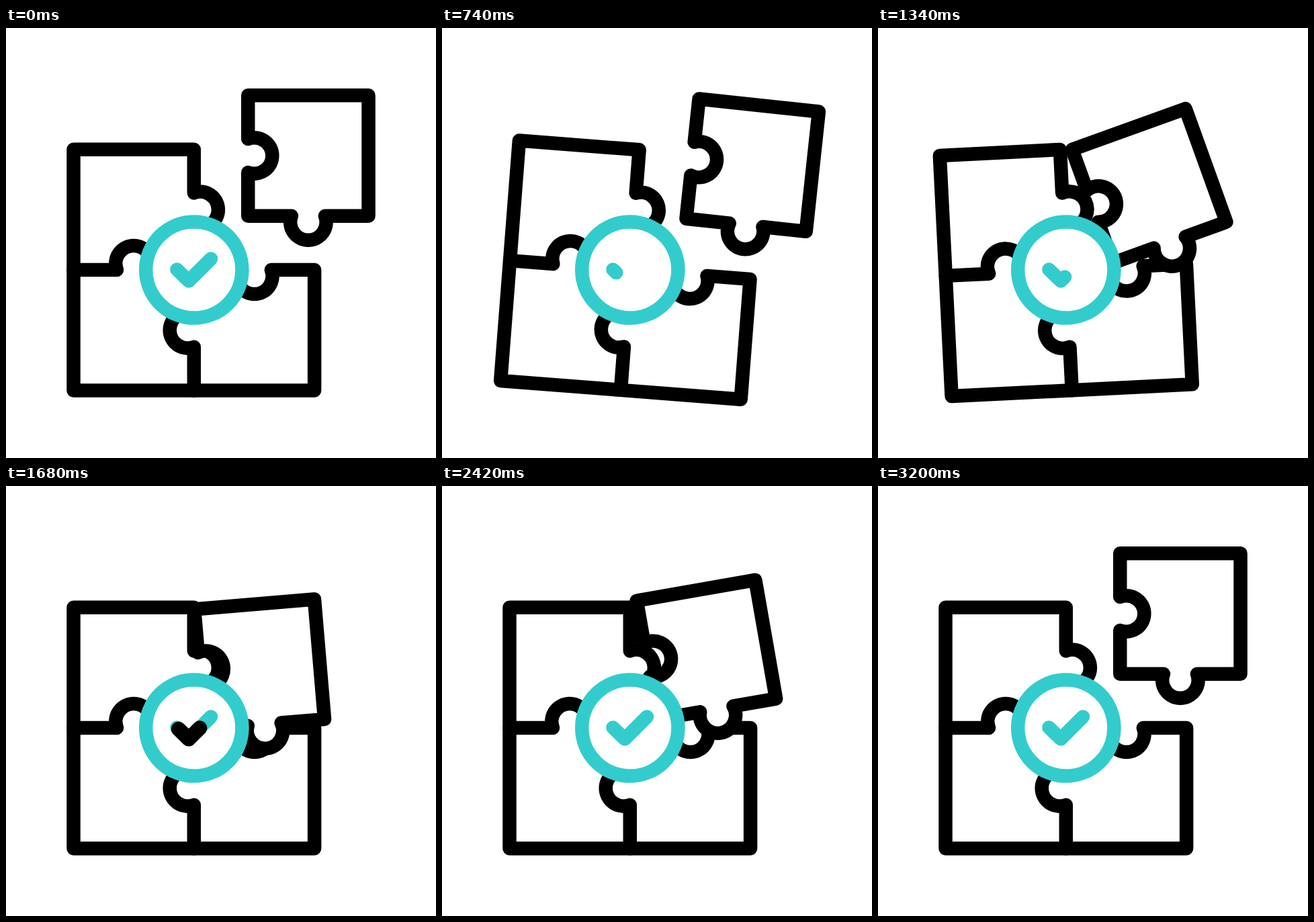
An HTML page for the animation above (3.42 s loop, 640 by 640 pixels).

```html
<!DOCTYPE html>
<html>
<head>
<meta charset="utf-8">
<style>
html, body { margin: 0; width: 100%; height: 100%; overflow: hidden; background: #fff; }
svg { display: block; width: 100%; height: 100%; }
</style>
</head>
<body>
<svg viewBox="0 0 640 640">
  <g transform="translate(279.8 360)" fill="none" stroke="#000" stroke-width="20.5" stroke-linecap="round" stroke-linejoin="round">
    <g id="board">
      <path d="M0 179.4H-179.3V-179.2H0V-114.6A26.7 26.7 0 1 1 0 -64.6"/>
      <path d="M-179.3 0H-114.8A26.7 26.7 0 1 1 -64.8 0"/>
      <path d="M0 179.4V114.8A26.7 26.7 0 1 1 0 64.8"/>
      <path d="M0 179.4H179.3V0H115A26.7 26.7 0 1 1 65 0"/>
      <path id="piece" fill="#fff" d="M-89.65 -25V-89.65H89.65V89.65H25A26.7 26.7 0 1 1 -25 89.65H-89.65V25A26.7 26.7 0 1 0 -89.65 -25"/>
    </g>
    <circle r="71.6" fill="#fff" stroke="#33cccc"/>
    <path id="check" stroke="#33cccc" pathLength="1" d="M-25.3 -.5L-7.8 16.5L25.2 -16.5"/>
    <path id="sweep" stroke-width="22" pathLength="1" d="M-25.3 -.5L-7.8 16.5L25.2 -16.5"/>
  </g>
</svg>
<script>
const LOOP = 3420;
const [board, piece, check, sweep] = ['board', 'piece', 'check', 'sweep'].map(id => document.getElementById(id));

function ease(t, from, to) {
  const p = Math.min(1, Math.max(0, (t - from) / (to - from)));
  return p * p * (3 - 2 * p);
}

// Rocks through the peaks and back to 0; each swing lasts ratio times the one before.
function swing(t, start, length, ratio, ...peaks) {
  let angle = 0, last = 0;
  for (const peak of [...peaks, 0]) {
    angle += (peak - last) * ease(t, start, start + length);
    last = peak;
    start += length;
    length *= ratio;
  }
  return angle;
}

function trim(path, start, end) {
  path.style.display = end > start ? '' : 'none';
  path.setAttribute('stroke-dasharray', `${end - start} 9`);
  path.setAttribute('stroke-dashoffset', -start);
}

function draw(t) {
  const tilt = swing(t, 0, 429, .97, -5.1, 6.2, -3.3);
  const spin = swing(t, 690, 270, 1.4, 18, -17) + swing(t, 1960, 413, 1, -11, 18.5);

  // The piece travels on a slightly bowed diagonal.
  const slide = ease(t, 690, 1880) - ease(t, 1960, 3200);
  const bow = (t < 1930 ? 5.6 : -1.7) * Math.sin(Math.PI * slide);
  const x = 170.1 - 80 * slide + bow, y = -170 + 80 * slide + bow;

  board.setAttribute('transform', `rotate(${tilt})`);
  piece.setAttribute('transform', `translate(${x} ${y}) rotate(${spin})`);
  trim(check, 0, Math.max(.002, 1 - ease(t, 246, 856) + ease(t, 1070, 1640)));
  trim(sweep, ease(t, 1640, 1960), ease(t, 1460, 1820));
}

const begin = performance.now();
function frame() {
  draw((performance.now() - begin) % LOOP);
  requestAnimationFrame(frame);
}
frame();
</script>
</body>
</html>
```
